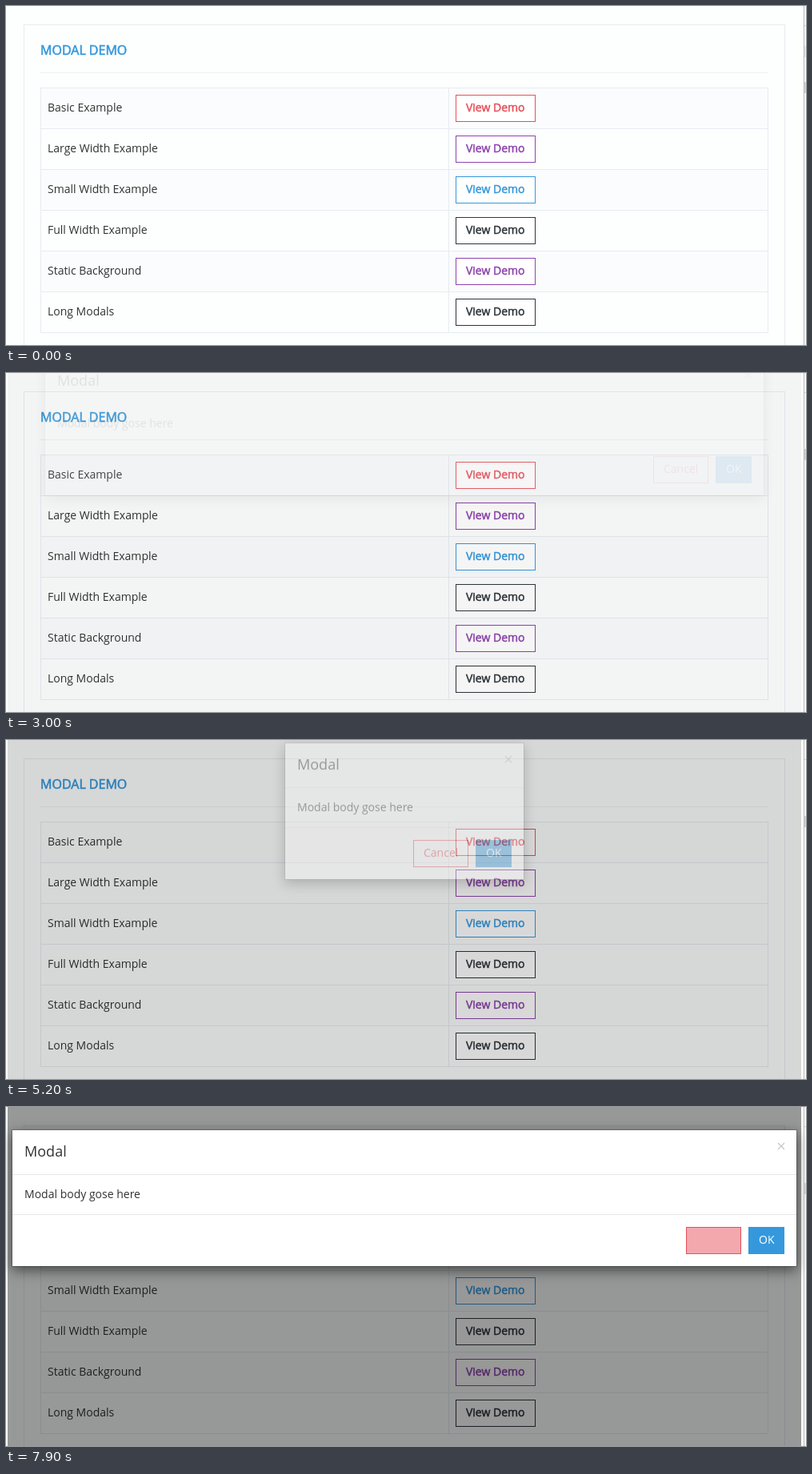
An HTML page that plays this animation: 1000 px wide and 424 px high, repeating every 8 s.

```html
<!DOCTYPE html>
<html lang="en">
<head>
<meta charset="utf-8">
<title>Modal demo</title>
<style>
  html, body { margin: 0; width: 100%; height: 100%; overflow: hidden; background: #fdfefe; }
  body { font: 14px/19px "Open Sans", sans-serif; color: #333; }
  #stage { position: absolute; left: 0; top: 0; width: 1000px; height: 424px; overflow: hidden; }
  #stage * { position: absolute; box-sizing: border-box; margin: 0; white-space: nowrap; }

  .panel { left: 22px; top: 23px; width: 952px; height: 420px; border: 1px solid #e7ecf1; }
  h1 { left: 43px; top: 44px; font: 16px/22px "Open Sans", sans-serif; color: #3598dc; -webkit-text-stroke: .6px; }
  .rule { left: 43px; top: 83px; width: 910px; height: 1px; background: #eef1f5; }

  .row { left: 43px; width: 910px; height: 52px; border: 1px solid #e7ecf1; background: #fdfefe; }
  .row:nth-child(odd) { background: #fbfcfd; }
  .row i { left: 509px; top: 0; width: 1px; height: 50px; background: #e7ecf1; }
  .row p { left: 8px; top: 14px; }

  .btn { height: 34px; border: 1px solid var(--c); background: #fff; color: var(--c); }
  .btn span { left: 12px; top: 5px; }
  .row .btn { left: 518px; top: 8px; width: 100px; }
  .row .btn span { -webkit-text-stroke: .5px; }

  .backdrop { left: 2px; top: 0; width: 992px; height: 424px; background: rgba(0, 0, 0, .405); opacity: 0; }
  .modal { top: 28px; height: 172px; opacity: 0; background: #fff; background-clip: padding-box;
           border: 1px solid rgba(0, 0, 0, .2); box-shadow: 0 5px 15px rgba(0, 0, 0, .5); }
  .modal h2 { left: 15px; top: 14px; font: 18px/24px "Open Sans", sans-serif; }
  .modal p { left: 15px; top: 70px; }
  .modal hr { left: 0; width: 100%; height: 1px; border: 0; background: #e8e8e8; }
  .modal svg { right: 14px; top: 15px; width: 10px; height: 10px; }
  .cancel { right: 69px; top: 121px; width: 69px; }
  .ok { right: 15px; top: 121px; width: 45px; background: var(--c); color: #fff; }

  .edge { left: 997px; top: 0; width: 1px; height: 424px; background: #b4b4b4; }
  .mark { left: 998px; width: 2px; background: #d2d2d2; }
</style>
</head>
<body>
<div id="stage">
  <div class="panel"></div>
  <h1>MODAL DEMO</h1>
  <div class="rule"></div>
  <div id="rows"></div>
  <div id="modals"></div>
  <div class="edge"></div>
  <div class="mark" style="top:24px;height:1px"></div>
  <div class="mark" id="thumb" style="top:50px;height:14px;background:#e6e6e6"></div>
  <div class="mark" style="top:95px;height:14px"></div>
</div>
<script>
const LOOP = 8000, STEP = 100;
const RED = '#e7505a', PURPLE = '#8e44ad', BLUE = '#3598dc', DARK = '#2f353b';
const HOVER = '#eef0f6', LIFT = 'translateY(-55px)', REST = 'translateY(0)';

const rows = [
  ['Basic Example', RED], ['Large Width Example', PURPLE], ['Small Width Example', BLUE],
  ['Full Width Example', DARK], ['Static Background', PURPLE], ['Long Modals', DARK]
];

// Times in ms: row hover, button fill, modal open, cancel hover, modal close.
const modals = [
  { x: 198, w: 600, hover: 200,  fill: 430,  open: 850,  cancel: 1800, close: 2150 },
  { x: 48,  w: 900, hover: 2600, fill: 2640, open: 2950, cancel: 3800, close: 4050 },
  { x: 348, w: 300, hover: 4500, fill: 4630, open: 5010, cancel: 5800, close: 6150 },
  { x: 7,   w: 982, hover: 6600, fill: 6640, open: 6950, cancel: 7800 }
];

const button = (label, color, kind = '') =>
  `<div class="btn ${kind}" style="--c:${color}"><span>${label}</span></div>`;

const byId = id => document.getElementById(id);

byId('rows').innerHTML = rows.map(([label, color], i) =>
  `<div class="row" style="top:${102 + 51 * i}px"><p>${label}</p><i></i>${button('View Demo', color)}</div>`).join('');

byId('modals').innerHTML = modals.map(({ x, w }) => `
  <div class="backdrop"></div>
  <div class="modal" style="left:${x}px;width:${w}px">
    <h2>Modal</h2>
    <svg><path d="M1 1L9 9M9 1L1 9" stroke="#c8c8c8" stroke-width="1.3"/></svg>
    <hr style="top:55px"><p>Modal body gose here</p><hr style="top:105px">
    ${button('Cancel', RED, 'cancel')}${button('OK', BLUE, 'ok')}
  </div>`).join('');

function play(el, prop, stops) {
  const frames = [[0, stops[0][1]], ...stops, [LOOP, stops[stops.length - 1][1]]]
    .map(([ms, value, easing = 'linear']) => ({ offset: ms / LOOP, [prop]: value, easing }));
  el.animate(frames, { duration: LOOP, iterations: Infinity, easing: `steps(${LOOP / STEP})` });
}

function fillButton(btn, color, stops) {
  const pick = (off, on) => stops.map(([ms, lit]) => [ms, lit ? on : off]);
  play(btn, 'backgroundColor', pick('#fff', color));
  play(btn, 'color', pick(color, '#fff'));
}

const rowEls = document.querySelectorAll('.row');
const backdropEls = document.querySelectorAll('.backdrop');
const modalEls = document.querySelectorAll('.modal');

modals.forEach(({ hover, fill, open, cancel, close }, i) => {
  const row = rowEls[i], modal = modalEls[i];
  const plain = getComputedStyle(row).backgroundColor;
  play(row, 'backgroundColor', [[hover, plain], [hover, HOVER], [open, HOVER], [open, plain]]);
  fillButton(row.querySelector('.btn'), rows[i][1], [[fill, 0], [fill + 270, 1], [open, 1], [open, 0]]);
  fillButton(modal.querySelector('.cancel'), RED, [[cancel, 0], [cancel + 200, 1]]);

  const fade = [[open, 0], [open + 500, 1]];
  const slide = [[open, LIFT, 'ease-out'], [open + 500, REST]];
  if (close) {
    fade.push([close, 1], [close + 500, 0]);
    slide.push([close, REST, 'ease-out'], [close + 680, LIFT]);
  }
  play(backdropEls[i], 'opacity', fade);
  play(modal, 'opacity', fade);
  play(modal, 'transform', slide);
});

play(byId('thumb'), 'opacity', [[300, 1], [300, 0]]);
</script>
</body>
</html>
```
